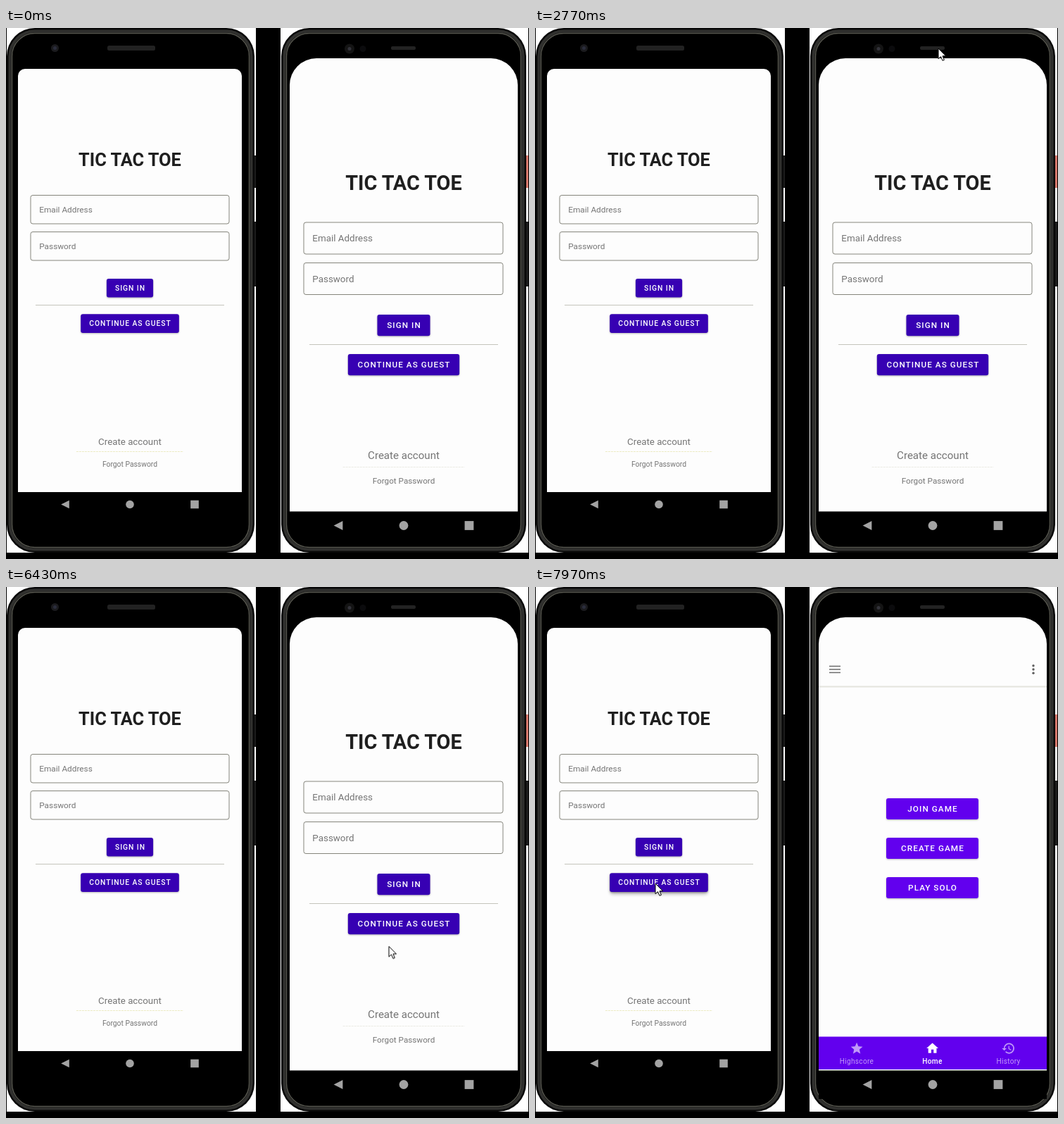
Recreate the animation shown at these times as an HTML page. Size 743x754 px, loop 8 s.

```html
<!DOCTYPE html>
<html lang="en">
<head>
<meta charset="utf-8">
<title>Two phones</title>
<style>
  html, body { margin: 0; width: 100%; height: 100%; overflow: hidden; background: #000; }
  svg { display: block; width: 100vw; height: 100vh; font-family: Roboto, sans-serif; }
  .title { font-weight: 700; fill: #1f1f1f; }
  .label { font-weight: 500; fill: #fff; letter-spacing: .0893em; }
  .grey { fill: #757575; }
  .btn { filter: drop-shadow(0 1px 1px rgba(0, 0, 0, .28)); }
  .login, .home { transform-origin: 565px 371px; }
  .login, .home, .pointer, .ripple, .press, .hover { animation: 8s linear infinite both; }
  .login { animation-name: login; }
  .home { animation-name: home, appear; animation-duration: 8s; }
  .pointer { animation-name: pointer; }
  .ripple { animation-name: ripple, rippleFade; }
  .press { animation-name: press; }
  .hover { animation-name: hover; }

  @keyframes login {
    0%, 86.875% { transform: scale(1); animation-timing-function: cubic-bezier(.3, 0, .8, .15); }
    87.71% { transform: scale(1.02); }
    87.875% { transform: scale(1.0335); animation-timing-function: cubic-bezier(.1, .8, .2, 1); }
    91.875%, 100% { transform: scale(1.05); }
  }
  @keyframes home {
    0%, 86.875% { transform: scale(.85); animation-timing-function: cubic-bezier(.3, 0, .8, .15); }
    87.71% { transform: scale(.91); }
    87.875% { transform: scale(.9475); animation-timing-function: cubic-bezier(.1, .8, .2, 1); }
    91.875%, 100% { transform: scale(1); }
  }
  @keyframes appear {
    0%, 87.25% { opacity: 0; }
    87.875% { opacity: .65; }
    88.25%, 100% { opacity: 1; }
  }
  @keyframes pointer {
    0%, 31.5% { transform: translate(576px, -24px); animation-timing-function: ease-out; }
    34.2%, 40% { transform: translate(573px, 29px); animation-timing-function: ease-in-out; }
    55.5%, 58.5% { transform: translate(547px, 404px); animation-timing-function: ease-in-out; }
    65%, 79% { transform: translate(552px, 476px); animation-timing-function: ease-in; }
    84% { transform: translate(480px, 780px); }
    91% { transform: translate(230px, 780px); animation-timing-function: ease-out; }
    98%, 100% { transform: translate(171px, 421px); }
  }
  @keyframes ripple {
    0%, 70.25% { transform: translate(553px, 478px) scale(.35); animation-timing-function: ease-out; }
    71.625% { transform: translate(558px, 478px) scale(.815); }
    73%, 100% { transform: translate(565px, 478px) scale(1); }
  }
  @keyframes rippleFade {
    0%, 70.25% { opacity: 0; }
    70.8%, 72% { opacity: .24; }
    74.5%, 100% { opacity: 0; }
  }
  @keyframes press {
    0%, 70.25% { opacity: 0; }
    71.5%, 72.5% { opacity: .3; }
    75%, 100% { opacity: 0; }
  }
  @keyframes hover {
    0%, 97% { opacity: 0; }
    98%, 100% { opacity: .3; }
  }
</style>
</head>
<body>
<svg viewBox="0 0 743 754" preserveAspectRatio="none">
  <defs>
    <clipPath id="screen"><path d="M403 727V81a38 38 0 0 1 38-38H689a38 38 0 0 1 38 38V727z"/></clipPath>
    <clipPath id="guest"><rect x="486" y="463" width="158" height="30" rx="3"/></clipPath>
    <filter id="soft" x="-20%" y="-50%" width="140%" height="220%"><feGaussianBlur stdDeviation="2.5"/></filter>
  </defs>
  <g id="stage"></g>
</svg>
<script>
const rect = (x, y, w, h, fill, rx = 0, more = '') =>
  `<rect x="${x}" y="${y}" width="${w}" height="${h}" rx="${rx}" fill="${fill}" ${more}/>`;
const text = (x, y, size, str, cls, more = 'text-anchor="middle"') =>
  `<text x="${x}" y="${y}" font-size="${size}" class="${cls}" ${more}>${str}</text>`;
const circle = (x, y, r, fill) => `<circle cx="${x}" cy="${y}" r="${r}" fill="${fill}"/>`;
const hline = (x1, x2, y, color, more = '') =>
  `<path d="M${x1} ${y}H${x2}" stroke="${color}" ${more}/>`;
const icon = (x, y, d, opacity) =>
  `<path transform="translate(${x - 10} ${y - 10}) scale(.84)" d="${d}" fill="#fff" opacity="${opacity}"/>`;

const button = (cx, y, w, h, size, fill, str, overlay = '') =>
  rect(cx - w / 2, y, w, h, fill, 3, 'class="btn"') + overlay +
  text(cx + .5, y + h / 2 + size * .356, size, str, 'label');

// unit: pixels per dp of the phone's screen
function login(p) {
  const { cx, unit, left, width, rowH } = p;
  const field = (y, str) =>
    rect(left, y, width, rowH, 'none', 3, 'stroke="#85857c"') +
    text(left + 11.5 + unit, y + rowH / 2 + unit * 5.6, unit * 16, str, 'grey', '');
  const h = unit * 36, small = unit * 14;
  return text(cx, p.title, unit * 34.4, 'TIC TAC TOE', 'title') +
    field(p.email, 'Email Address') + field(p.password, 'Password') +
    button(cx, p.sign, unit * 89.6, h, small, '#3700b3', 'SIGN IN') +
    hline(cx - 134, cx + 134, p.rule, '#c4c4bc') +
    button(cx, p.guest, unit * 189, h, small, '#3700b3', 'CONTINUE AS GUEST', p.overlay) +
    text(cx, p.create, unit * 18, 'Create account', 'grey') +
    hline(cx - unit * 103, cx + unit * 103, p.rule2, p.rule2Color, 'stroke-dasharray="3 1"') +
    text(cx, p.forgot, small, 'Forgot Password', 'grey');
}

function body(x, w) {
  const ring = (inset, color, sw) => rect(x + inset, inset, w - 2 * inset, 745 - 2 * inset, '#000',
    40 - inset, `stroke="${color}" stroke-width="${sw}"`);
  return rect(x, 0, w, 745, '#080808', 40) + ring(4.5, '#30302e', 4) + ring(7.5, '#57574f', 1.4);
}

const navKeys = (cx, y, gap, r) =>
  `<g fill="#a3a3a3"><path d="M${cx - gap - r} ${y}l${2 * r} ${-r}v${2 * r}z"/>
  <circle cx="${cx}" cy="${y}" r="${r}"/><rect x="${cx + gap - r}" y="${y - r}" width="${2 * r}" height="${2 * r}"/></g>`;

const star = 'M12 17.27L18.18 21l-1.64-7.03L22 9.24l-7.19-.61L12 2 9.19 8.63 2 9.24l5.46 4.73L5.82 21z';
const house = 'M10 20v-6h4v6h5v-8h3L12 3 2 12h3v8z';
const clock = 'M13 3a9 9 0 0 0-9 9H1l3.9 3.9L9 12H6a7 7 0 1 1 2 4.9l-1.4 1.4A9 9 0 1 0 13 3z' +
  'm-1 5v5l4.3 2.5.7-1.2-3.5-2.1V8z';

const home = () => {
  const items = [['JOIN GAME', 300], ['CREATE GAME', 356], ['PLAY SOLO', 412]];
  const tabs = [['Highscore', 457, star, .6], ['Home', 564.5, house, 1], ['History', 672.5, clock, .6]];
  return rect(403, 43, 324, 643.5, '#fdfdfd') + rect(403, 686.5, 324, 60, '#000') +
    [112.5, 117, 121.5].map(y => hline(418, 434, y, '#6b6b6b', 'stroke-width="1.5"')).join('') +
    [111.7, 117, 122.3].map(y => circle(708, y, 1.7, '#5f5f5f')).join('') +
    hline(403, 727, 141.5, '#e4e4de', 'stroke-width="2"') +
    items.map(([str, y]) => button(564.5, y, 131, 30, 11.75, '#6200ee', str)).join('') +
    rect(403, 638.5, 324, 46.5, '#6200ee') +
    tabs.map(([str, x, d, a]) => icon(x, 655, d, a) +
      text(x, 676.5, 10.1, str, '', `text-anchor="middle" fill="#fff" opacity="${a}"
        letter-spacing=".3" font-weight="${a === 1 ? 500 : 400}"`)).join('');
};

const hoverShadow = rect(107, 409, 138, 27, '#000', 3, 'class="hover" filter="url(#soft)"');
const pressShadow = rect(487, 468, 156, 30, '#000', 3, 'class="press" filter="url(#soft)"');
const ripple = '<g clip-path="url(#guest)"><circle class="ripple" r="81" fill="#fff"/></g>';

const leftPhone =
  rect(1, 0, 354, 745, '#fff') + rect(351, 181, 4, 46, '#1c1c1c') + rect(351, 275, 4, 92, '#1c1c1c') +
  body(1, 352) +
  circle(69.5, 28.5, 5.5, '#1b1b1e') + circle(69.5, 28.5, 2.5, '#2b2d3c') +
  rect(144, 25, 68, 7, '#222', 2.5) +
  '<path d="M17 659V68a10 10 0 0 1 10-10H325a10 10 0 0 1 10 10V659z" fill="#fdfdfd"/>' +
  hoverShadow +
  login({ cx: 176, unit: .739, left: 35, width: 282, rowH: 40.5, title: 196, email: 237.5, password: 289.5,
    sign: 356, rule: 393.5, guest: 406.3, create: 592, rule2: 601.5, rule2Color: '#ecebc4', forgot: 622.5,
    overlay: '' }) +
  navKeys(176, 676.5, 92, 5.8);

const rightPhone =
  rect(390, 0, 352, 745, '#fff') + rect(737, 181, 5, 46, '#d9796c') + rect(737, 275, 5, 92, '#1c1c1c') +
  body(391, 348) +
  circle(488, 29.5, 7, '#141414') + circle(488, 29.5, 2.5, '#33333a') + circle(507, 29.5, 4.5, '#0b0b0d') +
  rect(547, 26, 35, 5, '#232323', 2) +
  `<g clip-path="url(#screen)"><g class="login">${rect(403, 20, 324, 666.5, '#fdfdfd')}${pressShadow}` +
  login({ cx: 565, unit: .838, left: 423, width: 283, rowH: 45, title: 229.5, email: 276, password: 333.5,
    sign: 407, rule: 449.5, guest: 463, create: 612, rule2: 623.5, rule2Color: '#ebebe4', forgot: 646.8,
    overlay: ripple }) +
  `</g><g class="home">${home()}</g></g>` +
  navKeys(565, 706.5, 93, 6.4);

const pointer = `<path class="pointer" d="M0 0V14.8L3.5 11.6 6 17.3 8.4 16.3 6 10.8H10.6z"
  fill="#fff" stroke="#000"/>`;

document.getElementById('stage').innerHTML = leftPhone + rightPhone + pointer;
</script>
</body>
</html>
```
